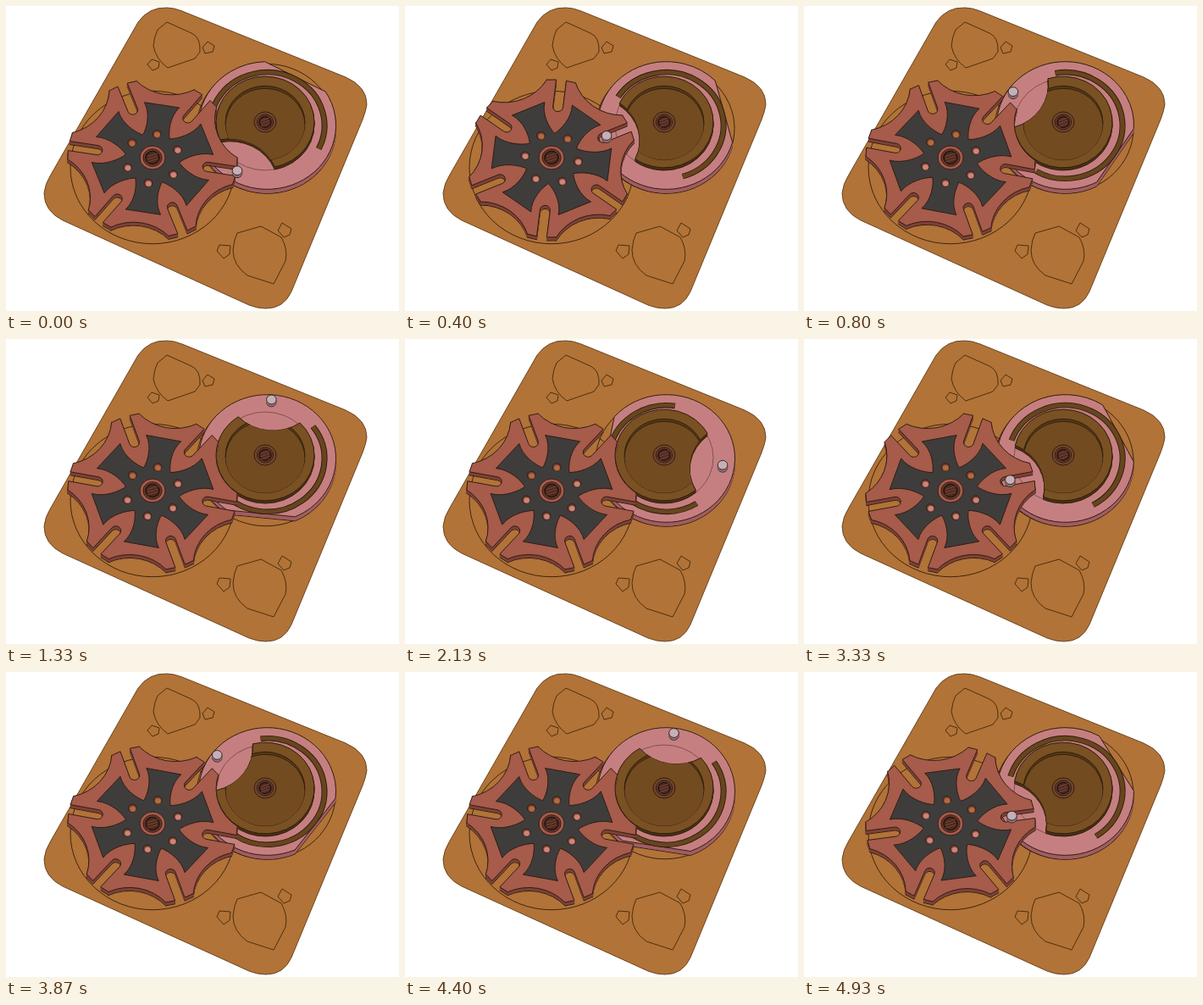
An HTML page with a canvas that plays this animation: 464x360 px, repeating every 5.07 s.

```html
<!DOCTYPE html>
<html lang="en">
<head>
<meta charset="utf-8">
<title>Geneva drive</title>
<style>
  html, body { margin: 0; width: 100%; height: 100%; overflow: hidden; background: #fff; }
  canvas { display: block; }
</style>
</head>
<body>
<canvas id="stage" width="464" height="360"></canvas>
<script>
const ctx = document.getElementById('stage').getContext('2d');
const RAD = Math.PI / 180, TAU = Math.PI * 2;
const TILT = 0.93;
const INK = '#2b1a10', BASE = '#b17337', WHEEL = '#a65b4b', PINK = '#c67f80', BROWN = '#795123';

const LOOP = 5070, STEP = 400 / 3, RUN_STEPS = 35;
const START = 118, TURN = 15.8;
const CRANK = 70.3, SPAN = { x: 133, y: -45.8 };
const FACING = Math.atan2(-SPAN.y, -SPAN.x);
const HOME = 11 * RAD;

const disc = r => { const p = new Path2D(); p.arc(0, 0, r, 0, TAU); return p; };

function polygon(points) {
  const p = new Path2D();
  points.forEach(([x, y]) => p.lineTo(x, y));
  p.closePath();
  return p;
}

// Maps a point given along and across a direction to plane coordinates.
function along(angle) {
  const c = Math.cos(angle), s = Math.sin(angle);
  return (x, y) => [x * c - y * s, x * s + y * c];
}

// Star wheel: six slotted arms joined by concave locking arcs.
function wheelOutline() {
  const p = new Path2D(), tip = 100, half = 6, root = 66;
  const edge = [tip * Math.cos(9.6 * RAD), tip * Math.sin(9.6 * RAD)];
  for (let i = 0; i < 6; i++) {
    const a = i * 60 * RAD, at = along(a);
    p.lineTo(...at(edge[0], -edge[1]));
    p.lineTo(...at(tip, -half));
    p.lineTo(...at(root, -half));
    p.arc(...at(root, 0), half, a - Math.PI / 2, a + Math.PI / 2, true);
    p.lineTo(...at(tip, half));
    p.lineTo(...at(...edge));
    const mid = a + 30 * RAD, open = 37 * RAD;
    p.arc(...along(mid)(140.6, 0), 58, mid + Math.PI + open, mid + Math.PI - open, true);
  }
  p.closePath();
  return p;
}

// Dark inlay, notched by six pointed petals along the slots.
function inlayOutline() {
  const p = new Path2D();
  for (let i = 0; i < 6; i++) {
    const at = along(i * 60 * RAD);
    p.lineTo(...at(70, -16.3));
    p.bezierCurveTo(...at(54, -18), ...at(38, -7), ...at(32, 0));
    p.bezierCurveTo(...at(38, 7), ...at(54, 18), ...at(70, 16.3));
  }
  p.closePath();
  return p;
}

function lockOutline() {
  const p = new Path2D();
  p.arc(0, 0, 58, 39.1 * RAD, 320.9 * RAD);
  p.arc(88, 0, 56.5, -139.6 * RAD, 139.6 * RAD, true);
  p.closePath();
  return p;
}

function crankOutline() {
  const p = new Path2D();
  p.arc(0, 0, 81, -150 * RAD, 150 * RAD);
  p.closePath();
  return p;
}

const wheel = wheelOutline(), inlay = inlayOutline(), lock = lockOutline(), crank = crankOutline();
const groove = new Path2D();
groove.arc(0, 0, 67.5, 47 * RAD, 268 * RAD);

const plate = new Path2D(`M156 19 Q169 1 190 2 Q198 2 208 6 L401 84 Q426 95 426 116
  Q425 124 421 134 L337 337 Q328 357 307 357 Q297 357 287 353 L67 253
  Q45 242 45 221 Q46 210 53 199 Z`);

const marks = [
  new Path2D('M190 19 L219 32 Q230 37 229 54 L223 62 L191 73 Q177 63 174 47 Q175 36 179 28 Z'),
  new Path2D('M301 260 L325 273 Q333 287 330 301 L316 328 L285 318 Q268 306 268 288 Q269 276 273 268 Z'),
  polygon([[238, 42], [246, 47], [244, 54], [235, 56], [232, 49]]),
  polygon([[172, 63], [181, 66], [180, 73], [173, 76], [167, 69]]),
  polygon([[326, 256], [337, 263], [335, 270], [328, 273], [321, 265]]),
  polygon([[252, 282], [265, 283], [264, 293], [257, 298], [249, 289]])
];

function pose(x, y, turn = 0) {
  ctx.setTransform(1, 0, 0, TILT, x, y);
  ctx.rotate(turn);
}

function paint(path, fill, line = INK, width = 0.9) {
  if (fill) { ctx.fillStyle = fill; ctx.fill(path); }
  ctx.strokeStyle = line;
  ctx.lineWidth = width;
  ctx.stroke(path);
}

function solid(path, x, y, turn, depth, side, top) {
  for (let d = depth; d > 0; d--) {
    pose(x, y + d, turn);
    paint(path, side, d === depth ? INK : side);
  }
  pose(x, y, turn);
  paint(path, top);
}

function drawBase() {
  ctx.setTransform(1, 0, 0, 1, 0, 0);
  paint(plate, BASE, '#6b4521', 1);
  marks.forEach(m => paint(m, null, '#4c2f14', 1));
  pose(173, 190.5);
  paint(disc(97), null);
  pose(307, 144.5);
  paint(disc(82), null);
}

function drawHub(x, y, r, ring) {
  pose(x, y);
  paint(disc(r), ring);
  paint(disc(r * 0.74), '#69382b');
  paint(disc(r * 0.54), '#4c2a20', '#1f1410', 1.4);
  ctx.beginPath();
  for (let k = -1; k < 2; k++) {
    ctx.moveTo(-r * 0.4, k * 3.5 + 2);
    ctx.lineTo(r * 0.4, k * 3.5 - 2);
  }
  ctx.strokeStyle = '#93533f';
  ctx.lineWidth = 0.7;
  ctx.stroke();
}

function drawDriver(turn) {
  solid(crank, 308.5, 141, turn, 5, '#a15d61', PINK);
  paint(groove, null, INK, 7);
  paint(groove, null, '#67451d', 5.2);

  pose(306, 140);
  paint(disc(58), null, '#6d4144', 0.8);
  solid(lock, 306, 137, turn, 3, '#4b3014', BROWN);
  ctx.save();
  ctx.clip(lock);
  pose(306, 138);
  paint(disc(47), '#573914');
  ctx.clip(disc(47));
  pose(306, 141);
  paint(disc(47), '#734b20');
  ctx.restore();
  drawHub(306, 137, 13, '#70442b');
}

function drawWheel(turn) {
  solid(wheel, 173, 180, turn, 4, '#7d4238', WHEEL);
  paint(inlay, '#3f3d3c');
  for (let i = 0; i < 6; i++) {
    const [x, y] = along(turn + (30 + 60 * i) * RAD)(31.5, 0);
    pose(173 + x, 180 + y * TILT);
    paint(disc(4.9), '#713d32');
    pose(173.4 + x, 180.9 + y * TILT);
    paint(disc(3.7), y < -16 ? '#b46b3c' : '#cf8579', '#713d32', 0.5);
  }
  drawHub(173, 179, 15, WHEEL);
}

function drawPin(x, y) {
  solid(disc(5.8), 306 + x, 136.5 + y * TILT, 0, 3, '#8e7079', '#c5afb9');
}

function render(time) {
  const step = Math.floor((time % LOOP + 3.5) / STEP) % 38;
  const turn = (START + TURN * (step % RUN_STEPS)) * RAD;
  const [x, y] = along(turn)(CRANK, 0);
  const engaged = Math.cos(turn - FACING) > 0.5;
  const wheelTurn = engaged ? Math.atan2(SPAN.y + y, SPAN.x + x) : HOME;

  ctx.setTransform(1, 0, 0, 1, 0, 0);
  ctx.clearRect(0, 0, 464, 360);
  ctx.lineJoin = 'round';
  drawBase();
  drawDriver(turn);
  drawWheel(wheelTurn);
  drawPin(x, y);
}

const began = performance.now();
function tick() {
  render(performance.now() - began);
  requestAnimationFrame(tick);
}
tick();
</script>
</body>
</html>
```
